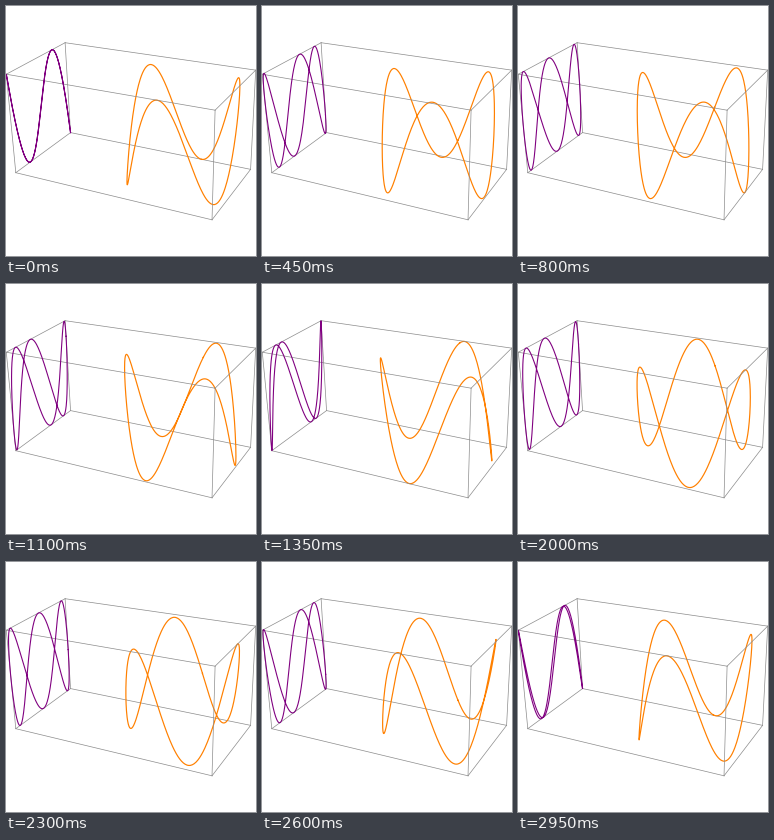
These frames come from a looping animation (250x250 px, 3000 ms). A matplotlib script:

```python
import itertools

import numpy as np
import matplotlib.pyplot as plt
from matplotlib.animation import FuncAnimation

SIZE, DPI = 250, 100
FRAMES, INTERVAL = 60, 50
PX = 72 / DPI

# Camera: angles in degrees, distance in box units, zoom in pixels per unit
AZIMUTH, ELEVATION, ROLL = np.radians([27.6, 24.1, 1.3])
DISTANCE, ZOOM = 13.53, 54.1
CENTER = 125.3, 116.6

X_RANGE = -3, 1  # the shadow falls on the wall at the lower end
HIDDEN = (X_RANGE[0], 1, -1)


def project(x, y, z):
    """Perspective view of a point, in screen pixels."""
    x = x - np.mean(X_RANGE)
    right = x * np.cos(AZIMUTH) + y * np.sin(AZIMUTH)
    back = y * np.cos(AZIMUTH) - x * np.sin(AZIMUTH)
    up = back * np.sin(ELEVATION) + z * np.cos(ELEVATION)
    depth = back * np.cos(ELEVATION) - z * np.sin(ELEVATION)
    scale = ZOOM / (1 + depth / DISTANCE)
    u = right * np.cos(ROLL) - up * np.sin(ROLL)
    v = right * np.sin(ROLL) + up * np.cos(ROLL)
    return CENTER[0] + scale * u, CENTER[1] - scale * v


fig = plt.figure(figsize=(SIZE / DPI, SIZE / DPI), dpi=DPI, facecolor="white")
ax = fig.add_axes([0, 0, 1, 1])
ax.set_xlim(-0.5, SIZE - 0.5)
ax.set_ylim(SIZE - 0.5, -0.5)
ax.axis("off")

corners = itertools.product(X_RANGE, (-1, 1), (-1, 1))
for a, b in itertools.combinations(corners, 2):
    if sum(i != j for i, j in zip(a, b)) == 1:
        layer = 1 if HIDDEN in (a, b) else 3
        ax.plot(*project(*np.array([a, b], float).T),
                color="0.55", lw=0.7 * PX, zorder=layer)

theta = np.linspace(0, 2 * np.pi, 400)
curve, = ax.plot([], [], color=(1, 0.5, 0), lw=1.2 * PX, zorder=2)
shadow, = ax.plot([], [], color=(0.5, 0, 0.5), lw=1.1 * PX, zorder=4)


def update(i):
    phase = 2 * np.pi * i / FRAMES
    x, y = np.sin(theta), np.cos(theta)
    z = -np.cos(3 * theta + phase)
    curve.set_data(*project(x, y, z))
    shadow.set_data(*project(X_RANGE[0], y, z))
    return curve, shadow


anim = FuncAnimation(fig, update, frames=FRAMES, interval=INTERVAL,
                     repeat=True, repeat_delay=0)
plt.show()
```
